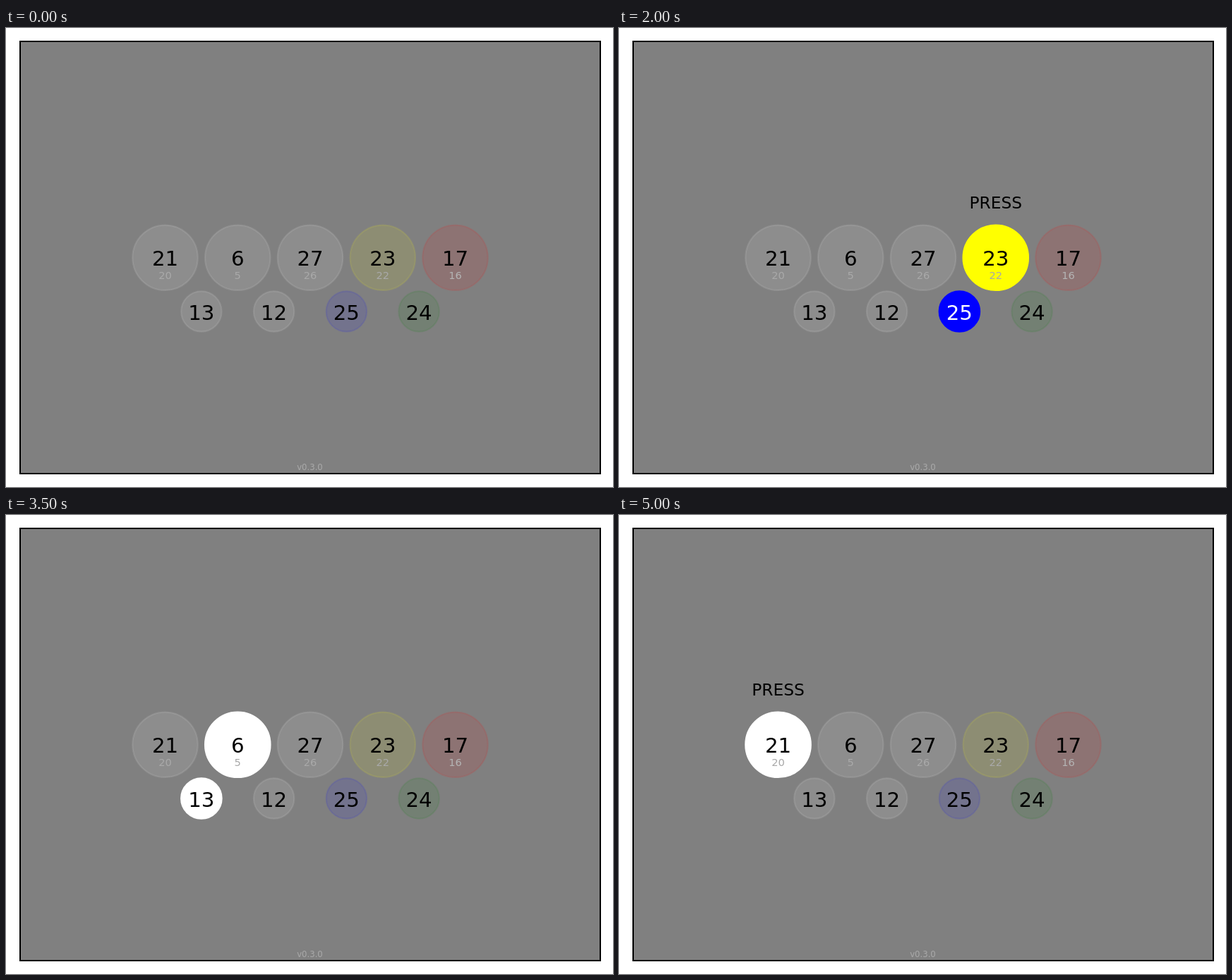
These frames come from a looping animation (860 px wide and 651 px high, 5.5 s). An HTML page:

```html
<!DOCTYPE html>
<html lang="en">
<head>
<meta charset="utf-8">
<title>Button sequence</title>
<style>
  html, body { margin: 0; width: 100%; height: 100%; overflow: hidden; background: #fff; }
  svg { display: block; }
  text { font-family: "DejaVu Sans", sans-serif; text-anchor: middle; }
  circle { stroke-width: 2.2; }
</style>
</head>
<body>
<svg id="stage" width="860" height="651" viewBox="0 0 860 651">
  <rect x="20" y="19" width="822" height="613" fill="#808080" stroke="#000" stroke-width="2"/>
</svg>
<script>
const stage = document.getElementById('stage');
const STEP = 500, STEPS = 11, GAP = 102.75;

function add(tag, attrs, content = '') {
  const el = document.createElementNS('http://www.w3.org/2000/svg', tag);
  for (const key in attrs) el.setAttribute(key, attrs[key]);
  el.textContent = content;
  stage.append(el);
  return el;
}

const label = (x, y, size, fill, content) =>
  add('text', { x, y, 'font-size': size, fill }, content);

function makeLamp(x, y, r, color, pin) {
  const disc = add('circle', { cx: x, cy: y, r, fill: color, stroke: color });
  const text = label(x, y + (r > 40 ? 11.25 : 12), 29.2, '#000', pin);
  return on => {
    const alpha = on ? 1 : 0.1;
    disc.setAttribute('fill-opacity', alpha);
    disc.setAttribute('stroke-opacity', alpha);
    text.setAttribute('fill', on && color === 'blue' ? '#fff' : '#000');
  };
}

// Right to left, in the order in which they light up
const buttons = [
  [17, 16, 'red'], [23, 22, 'yellow'], [27, 26, 'white'], [6, 5, 'white'], [21, 20, 'white']
].map(([pin, input, color], i) => {
  const x = 636.5 - GAP * i;
  const light = makeLamp(x, 325.75, 46.2, color, pin);
  label(x, 356, 14.6, i ? '#a9a9a9' : '#b4b4b4', input);
  return { x, light };
});

const leds = [[24, 'green'], [25, 'blue'], [12, 'white'], [13, 'white']]
  .map(([pin, color], i) => makeLamp(585.1 - GAP * i, 402, 28.7, color, pin));

label(430.5, 627, 11.67, '#a9a9a9', 'v0.3.0');
const press = label(0, 256, 23.3, '#000', 'PRESS');

function draw(now) {
  const step = Math.floor(now / STEP) % STEPS;
  const active = Math.ceil(step / 2) - 1;
  buttons.forEach((button, i) => button.light(i === active));
  leds.forEach((light, i) => light(i === active));
  const pressed = step > 0 && step % 2 === 0;
  press.setAttribute('visibility', pressed ? 'visible' : 'hidden');
  if (pressed) press.setAttribute('x', buttons[active].x);
}

const start = performance.now();
function tick() {
  draw(performance.now() - start);
  requestAnimationFrame(tick);
}
tick();
</script>
</body>
</html>
```
